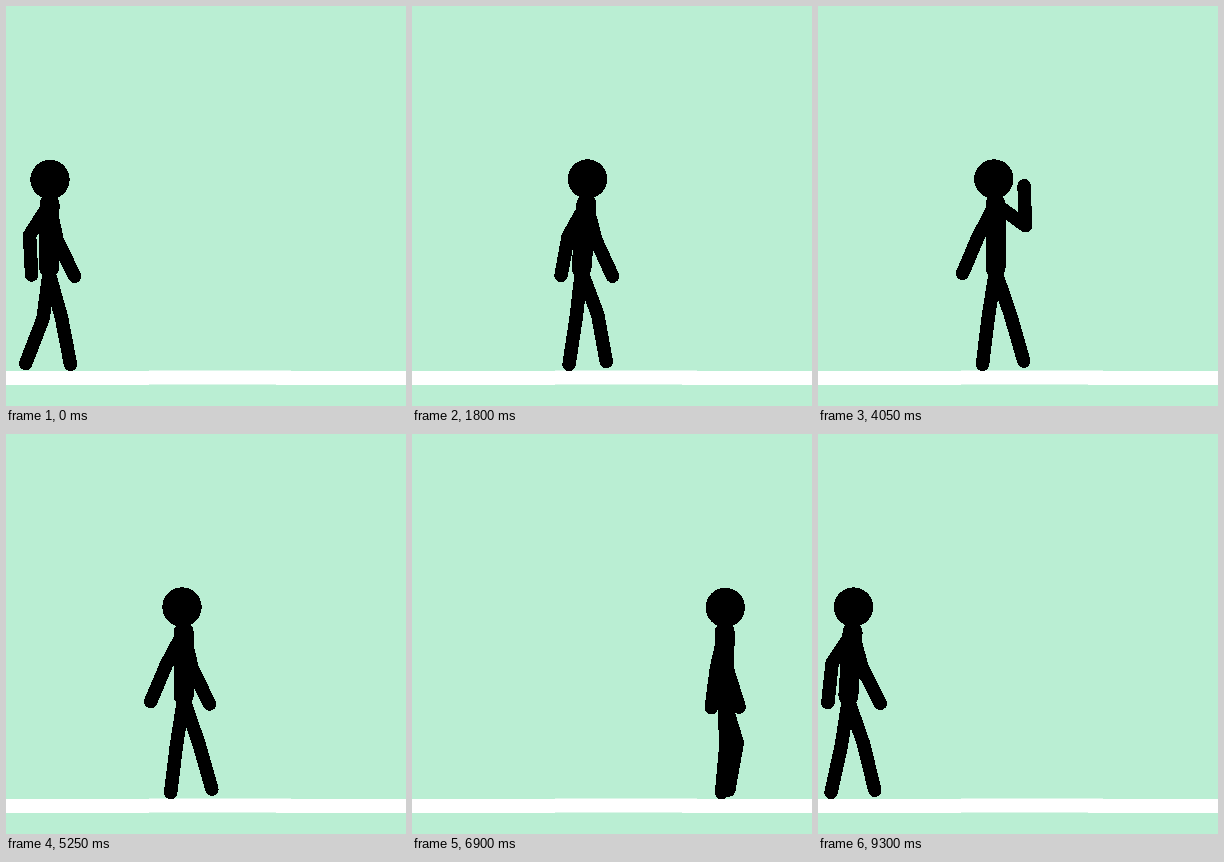
An HTML page for the animation above (9.6 s loop, 400x400 px).

```html
<!DOCTYPE html>
<html>
<head>
<meta charset="utf-8">
<style>
  html, body { margin: 0; width: 100%; height: 100%; overflow: hidden; background: #baeed3; }
  svg { display: block; width: 100%; height: 100%; }
  #man { shape-rendering: crispEdges; }
  #man path { fill: none; stroke: #000; stroke-linecap: round; stroke-linejoin: round; }
</style>
</head>
<body>
<svg viewBox="0 0 400 400">
  <path fill="#fff" d="M0 365H143V364.5H285V365H400V379H270V378.5H143V379H0Z"/>
  <g id="man">
    <path id="limbs" stroke-width="13.5"/>
    <path id="torso" stroke-width="20"/>
    <circle id="head" r="19.7"/>
  </g>
</svg>
<script>
const LOOP = 9600, STEP = 150, NECK = 198, HIP = 262, GROUND = 358.5;
const ARM = [37, 40], LEG = [46, 48];
const [man, limbs, torso, head] = ['man', 'limbs', 'torso', 'head'].map(id => document.getElementById(id));

// time, strides walked, head x
const walk = [
  [0, .27, 44], [1200, 2, 130], [1800, 3, 175.5], [5250, 3, 176],
  [8250, 8, 425.5], [8400, .85, -35], [9300, 2.1, 35.5]
];
// Standing angles: rear arm, front arm, rear leg, front leg; upper part then lower part
const stand = [-28, -23, 13, 26, -9, -7, 19, 16];

const { sin, cos, PI } = Math;
const lerp = (a, b, k) => a + (b - a) * k;
const mix = (a, b, k) => a.map((v, i) => lerp(v, b[i], k));
const ramp = (t, from, to) => Math.min(1, Math.max(0, (t - from) / (to - from)));

// Joint angle over a two-stride cycle, in degrees forward from straight down
const joint = (p, mean, a1, shift1, a2, shift2) =>
  mean + a1 * cos(PI * p - shift1) + a2 * cos(2 * PI * p - shift2);
const armAngles = p => [joint(p, -7.5, -24.3, .43, -3, 1.57), joint(p, 9.6, -17.5, 0, 5.2, 2.05)];
const legAngles = p => [joint(p, 7, -14, .25, -3, 1.57), joint(p, -6, -16.1, .94, 7.1, .25)];

// Elbow and hand, or knee and foot, relative to the joint at the body
function reach([l1, l2], [upper, lower]) {
  const a = upper * PI / 180, b = lower * PI / 180;
  const x = l1 * sin(a), y = l1 * cos(a);
  return [[x, y], [x + l2 * sin(b), y + l2 * cos(b)]];
}

function walkAt(t) {
  const i = Math.max(1, walk.findIndex(key => key[0] >= t));
  const end = t >= walk.at(-1)[0] ? walk.length - 1 : i;
  const [a, b] = [walk[end - 1], walk[end]];
  return mix(a, b, ramp(t, a[0], b[0])).slice(1);
}

// Raise the front arm, swing its forearm from upright to outward and back, lower it
function raiseArm([upper, lower], t) {
  const lift = ramp(t, 2250, 2850) * (1 - ramp(t, 4650, 5250));
  const beat = ramp(t, 2850, 4650) * 3;
  const forearm = 117 + 65 * Math.abs(beat % 2 - 1);
  return [lerp(upper, 54, lift), lerp(lower, forearm, lift)];
}

function draw(now) {
  const t = Math.floor(now % LOOP / STEP) * STEP;
  const [strides, x] = walkAt(t);
  const p = strides % 1, bob = cos(2 * PI * p);
  const still = ramp(t, 2250, 2850) * (1 - ramp(t, 5250, 5400));
  const gait = [armAngles(p), armAngles(p + 1), legAngles(p), legAngles(p + 1)].flat();
  const angles = mix(gait, stand, still);
  const neck = lerp(-.5 - .5 * bob, 1.7, still);
  const hip = lerp(-1.5 - 4.5 * bob, 1.7, still);

  const arms = [angles.slice(0, 2), raiseArm(angles.slice(2, 4), t)].map(a => reach(ARM, a));
  const legs = [angles.slice(4, 6), angles.slice(6)].map(a => reach(LEG, a));
  const legTop = GROUND - Math.max(...legs.map(([, foot]) => foot[1]));
  const line = (ox, oy) => points => `M${ox} ${oy}` + points.map(([dx, dy]) => `L${ox + dx} ${oy + dy}`).join('');

  man.setAttribute('transform', `translate(${x})`);
  head.setAttribute('cy', 173.5 - .5 * bob);
  torso.setAttribute('d', `M${neck} ${NECK}L${hip} ${HIP}`);
  limbs.setAttribute('d', [...arms.map(line(neck, NECK)), ...legs.map(line(hip, legTop))].join(''));
}

const start = performance.now();
function frame() {
  draw(performance.now() - start);
  requestAnimationFrame(frame);
}
frame();
</script>
</body>
</html>
```
